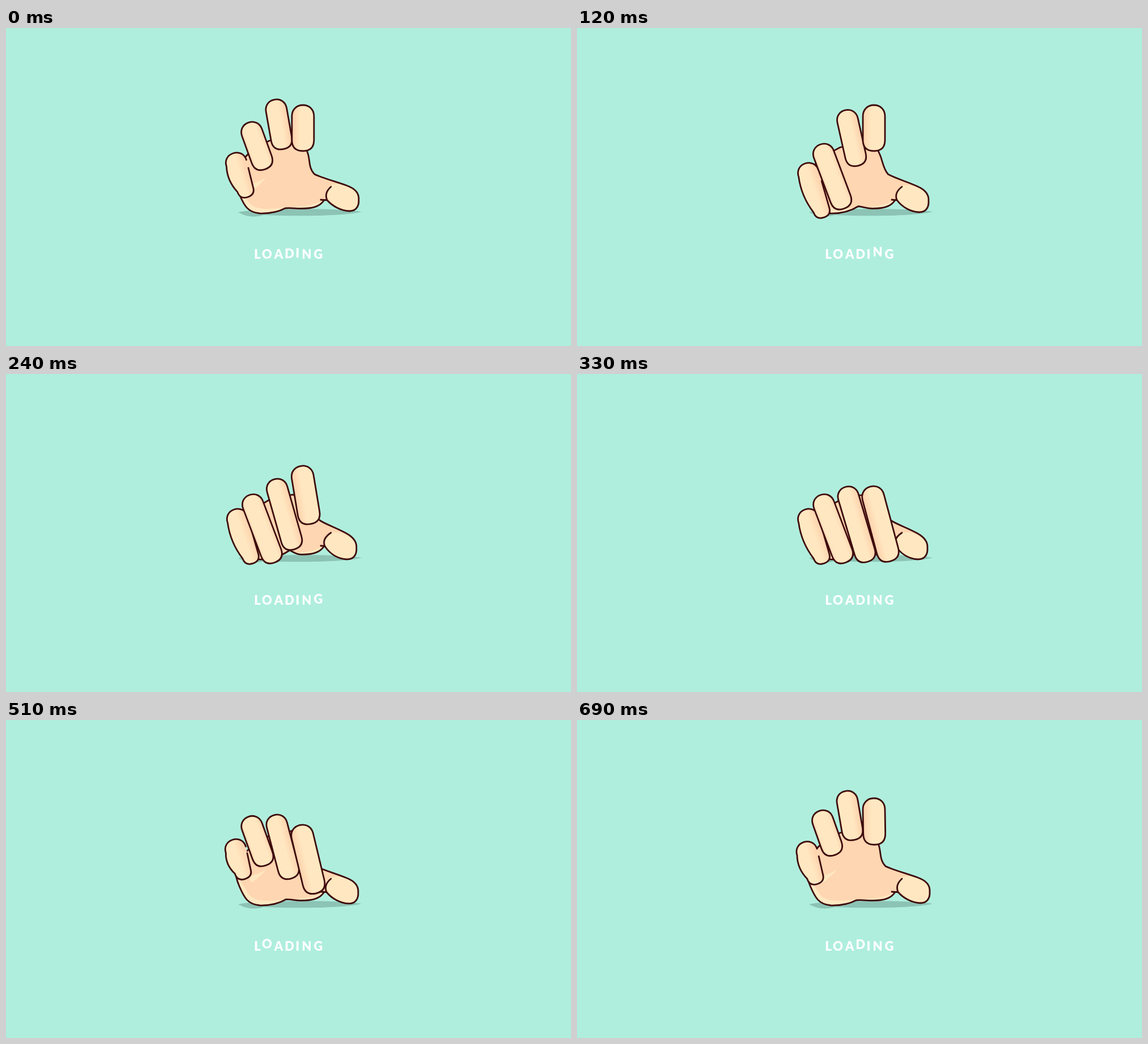
These frames come from a looping animation (998x561 px, 0.72 s). An HTML page with a canvas:

```html
<!DOCTYPE html>
<html lang="en">
<head>
<meta charset="utf-8">
<title>Loading</title>
<style>
  html, body { margin: 0; width: 100%; height: 100%; overflow: hidden; background: #afeedd; }
  canvas { display: block; }
</style>
</head>
<body>
<canvas id="stage" width="998" height="561"></canvas>
<script>
const ctx = document.getElementById('stage').getContext('2d');
const LOOP = 720, STEP = 30;
const BACK = '#afeedd', SHADOW = '#8cc3b4', INK = '#3e0a0c', LIGHT = '#ffe8c1', SKIN = '#fed6b1';

const KEYS = [0, 120, 240, 330, 450, 570, 690];
const CLOSING = [0, 0.5, 1, 1, 0.6, 0, 0];

// x and lean: position of each end in the open hand, and its drift per pixel of fall.
const FINGERS = [
  { x: [407, 422.5], lean: [0.11, 0.25], r: [18.5, 14.5], bow: 9, gap: 0.3,
    tones: [[0, LIGHT], [0.5, LIGHT], [0.85, SKIN]],
    top: [238.5, 256.5, 256.5, 256.5, 234, 226.5, 233],
    end: [284.5, 320.5, 320.5, 320.5, 277.5, 261.5, 275.5] },
  { x: [434.5, 451.5], lean: [0.04, 0.2], r: [18.7, 18.7], bow: 0, gap: 0,
    tones: [[0, SKIN], [0.15, LIGHT], [0.75, LIGHT], [1, SKIN]],
    top: [184.5, 223, 231, 231, 210.5, 172.5, 178],
    end: [231.5, 301, 315, 315, 279, 210.5, 220.5] },
  { x: [477.5, 486.5], lean: [0.027, 0.183], r: [18.5, 18.5], bow: 0, gap: 0,
    tones: [[0, LIGHT], [0.6, LIGHT], [0.9, SKIN]],
    top: [144.5, 163, 203.5, 217, 213.5, 154.5, 143.5],
    end: [195.5, 225, 291.5, 313.5, 307.5, 211.5, 193.5] },
  { x: [524.5, 524.5], lean: [-0.02, 0.21], r: [19.5, 19.5], bow: 0, gap: 0,
    tones: [[0.1, SKIN], [0.4, LIGHT], [1, LIGHT]],
    top: [155.5, 155.5, 181.5, 217.5, 217.5, 184, 157.5],
    end: [197.5, 197.5, 245.5, 311.5, 311.5, 248.5, 200.5] }
];

// Letter, centre x, moment of its hop.
const LETTERS = [['L', 444, 430], ['O', 461, 512], ['A', 481.5, 594], ['D', 500.5, 676],
                 ['I', 515, 38], ['N', 531, 120], ['G', 551.5, 202]];

// Cyclic monotone cubic through the key values.
function sample(values, time) {
  const n = KEYS.length;
  const wrap = i => (i + n) % n;
  const span = i => (KEYS[wrap(i + 1)] - KEYS[wrap(i)] + LOOP) % LOOP;
  const secant = i => (values[wrap(i + 1)] - values[wrap(i)]) / span(i);
  const slope = i => {
    const a = secant(i - 1), b = secant(i);
    return a * b <= 0 ? 0 : 2 * a * b / (a + b);
  };
  let i = n - 1;
  while (KEYS[i] > time) i--;
  const d = span(i), u = (time - KEYS[i]) / d, w = 1 - u;
  return values[i] * (1 + 2 * u) * w * w + slope(i) * d * u * w * w
       + values[wrap(i + 1)] * u * u * (3 - 2 * u) - slope(i + 1) * d * u * u * w;
}

function drawShadow() {
  ctx.fillStyle = SHADOW;
  ctx.beginPath();
  ctx.moveTo(410, 325);
  ctx.bezierCurveTo(440, 318, 590, 317, 628, 324);
  ctx.bezierCurveTo(606, 331, 520, 333, 455, 330);
  ctx.bezierCurveTo(438, 335, 424, 333, 410, 325);
  ctx.fill();
}

function palmPath(c) {
  const p = new Path2D();
  p.moveTo(428 + 2 * c, 222 + 28 * c);
  p.quadraticCurveTo(446, 207 + 25 * c, 465, 199 + 23 * c);
  p.lineTo(505, 190 + 23 * c);
  p.lineTo(530, 214);
  p.bezierCurveTo(539 + 3 * c, 228, 532 + 12 * c, 245, 545 + 9 * c, 258);
  p.bezierCurveTo(560 + 4 * c, 265, 583, 271, 602 - c, 278 + 3 * c);
  const dx = -4 * c, dy = 4 * c;
  p.bezierCurveTo(616 + dx, 283 + dy, 624 + dx, 291 + dy, 623 + dx, 303 + dy);
  p.bezierCurveTo(624 + dx, 317 + dy, 616 + dx, 323 + dy, 606 + dx, 323 + dy);
  p.bezierCurveTo(592 + dx, 322 + dy, 577 + dx, 315 + dy, 567 + dx, 303.5);
  p.lineTo(562, 303.5);
  p.bezierCurveTo(554, 316, 540, 318.5, 522, 318.5);
  p.bezierCurveTo(512, 318.5, 502 + 6 * c, 317 - 3 * c, 493 + 8 * c, 318 - 7 * c);
  p.bezierCurveTo(480, 325, 465, 327.5, 448, 327);
  p.bezierCurveTo(427, 325, 421, 314, 412, 293);
  p.bezierCurveTo(407, 282, 405, 270, 402, 250);
  p.closePath();
  return p;
}

function drawPalm(c) {
  const palm = palmPath(c);
  ctx.fillStyle = SKIN;
  ctx.fill(palm);

  ctx.save();
  ctx.clip(palm);
  ctx.fillStyle = LIGHT;
  ctx.beginPath();
  ctx.moveTo(398, 262);
  ctx.bezierCurveTo(415, 285, 424, 300, 430, 309);
  ctx.bezierCurveTo(442, 322, 470, 320, 492, 316);
  ctx.bezierCurveTo(515, 316, 545, 315, 562, 302);
  ctx.lineTo(562, 335);
  ctx.lineTo(398, 335);
  ctx.fill();
  ctx.beginPath();
  ctx.moveTo(428, 276);
  ctx.quadraticCurveTo(446, 273, 460, 263);
  ctx.quadraticCurveTo(450, 276, 434, 287);
  ctx.fill();
  ctx.beginPath();
  ctx.ellipse(596 - 4 * c, 298 + 4 * c, 32, 20, 0.45, 0, 7);
  ctx.fill();
  ctx.restore();

  ctx.stroke(palm);
  ctx.beginPath();
  ctx.moveTo(574, 280);
  ctx.bezierCurveTo(565 - 3 * c, 288, 564 - 4 * c, 296, 567 - 4 * c, 303.5);
  ctx.moveTo(556, 303);
  ctx.lineTo(563, 303.5);
  ctx.stroke();
}

function drawFinger(f, time) {
  const y1 = sample(f.top, time), y2 = sample(f.end, time);
  const x1 = f.x[0] + (y1 - f.top[0]) * f.lean[0];
  const x2 = f.x[1] + (y2 - f.end[0]) * f.lean[1];
  const len = Math.hypot(x2 - x1, y2 - y1);
  const [a, b] = f.r, h = 0.59 * a, k = 0.66 * b;

  ctx.save();
  ctx.translate(x1, y1);
  ctx.rotate(Math.atan2(x1 - x2, y2 - y1));
  ctx.beginPath();
  ctx.moveTo(a + (b - a) * f.gap, len * f.gap);
  ctx.lineTo(b, len);
  ctx.bezierCurveTo(b, len + k, k, len + b, 0, len + b);
  ctx.bezierCurveTo(-k, len + b, -b, len + k, -b, len);
  ctx.quadraticCurveTo(-(a + b) / 2 - f.bow, len / 2, -a, 0);
  ctx.bezierCurveTo(-a, -h, -h, -a, 0, -a);
  ctx.bezierCurveTo(h, -a, a, -h, a, 0);
  if (!f.gap) ctx.closePath();
  const tone = ctx.createLinearGradient(-a, 0, a, 0);
  f.tones.forEach(([at, colour]) => tone.addColorStop(at, colour));
  ctx.fillStyle = tone;
  ctx.fill();
  ctx.stroke();
  ctx.restore();
}

function drawText(time) {
  ctx.fillStyle = '#fff';
  ctx.font = '900 22px Lato, sans-serif';
  ctx.textAlign = 'center';
  for (const [letter, x, peak] of LETTERS) {
    const away = Math.abs((time - peak + 1.5 * LOOP) % LOOP - LOOP / 2);
    const hop = away < 75 ? 3.5 * Math.cos(Math.PI * away / 150) ** 2 : 0;
    ctx.fillText(letter, x, 406.8 - hop);
  }
}

function draw(now) {
  const time = Math.floor(now % LOOP / STEP) * STEP;
  ctx.fillStyle = BACK;
  ctx.fillRect(0, 0, 998, 561);
  ctx.strokeStyle = INK;
  ctx.lineWidth = 2.8;
  ctx.lineCap = ctx.lineJoin = 'round';
  drawShadow();
  drawPalm(sample(CLOSING, time));
  FINGERS.forEach(f => drawFinger(f, time));
  drawText(time);
}

let start;
function tick(now) {
  start ??= now;
  draw(Math.max(0, now - start));
  requestAnimationFrame(tick);
}
draw(0);
requestAnimationFrame(tick);
</script>
</body>
</html>
```
